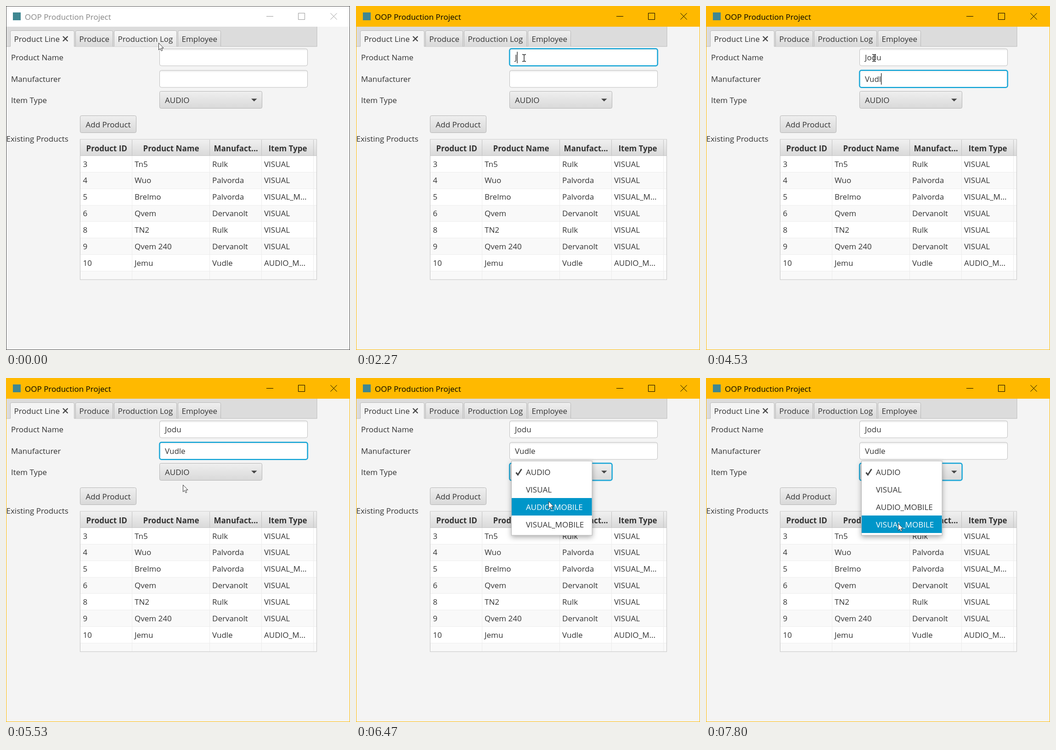
Animation, 749 px wide and 748 px high, one loop 8000 ms. Source, as an HTML page:

```html
<!DOCTYPE html>
<html lang="en">
<head>
<meta charset="utf-8">
<title>OOP Production Project</title>
<style>
html, body { margin: 0; width: 100%; height: 100%; overflow: hidden; background: #f4f4f4; }
svg { display: block; }
text { font: 17px "Open Sans", "Noto Sans", sans-serif; fill: #333; white-space: pre; }
.bold { font-weight: 700; }
.mid { text-anchor: middle; }
#popup { filter: drop-shadow(0 4px 6px rgba(0, 0, 0, .32)); }
</style>
</head>
<body>
<svg id="stage" width="749" height="748" viewBox="0 0 749 748"></svg>
<script>
const LOOP = 8000;
const stage = document.getElementById('stage');
const $ = id => document.getElementById(id);

// Markup helpers
const rect = (x, y, w, h, fill, more = '') =>
  `<rect x="${x}" y="${y}" width="${w}" height="${h}" fill="${fill}" ${more}/>`;
const text = (x, y, s, more = '') => `<text x="${x}" y="${y}" ${more}>${s}</text>`;
const line = (d, color, more = '') => `<path d="${d}" fill="none" stroke="${color}" ${more}/>`;
const gradient = (id, stops) =>
  `<linearGradient id="${id}" x2="0" y2="1">` +
  stops.map(([o, c]) => `<stop offset="${o}" stop-color="${c}"/>`).join('') + '</linearGradient>';

const defs = '<defs>' +
  gradient('btn', [[0, '#efefef'], [1, '#d9d9d9']]) +
  gradient('lit', [[0, '#f8f8f8'], [1, '#e6e6e6']]) +
  gradient('head', [[0, '#f0f0f0'], [1, '#d9d9d9']]) +
  gradient('input', [[0, '#ececec'], [.14, '#fff'], [1, '#fff']]) +
  '</defs>';

function titleBar() {
  return rect(0, 0, 749, 45, '#fff', 'id="bar"') +
    rect(15, 14, 17, 17, '#3f8791') +
    text(41, 29.5, 'OOP Production Project', 'id="title"') +
    line('M567 22.5H582M636.5 15.5H650.5V29.5H636.5ZM706.5 15.5L720.5 29.5M720.5 15.5L706.5 29.5',
      '#999', 'id="buttons"') +
    rect(.5, .5, 748, 747, 'none', 'id="frame"');
}

function tab(x, right, label, id = '') {
  const on = id === 'selected';
  const edge = `M${x + .5} 88V56.5Q${x + .5} 53.5 ${x + 3.5} 53.5H${right - 3.5}` +
    `Q${right - .5} 53.5 ${right - .5} 56.5V88`;
  return `<path id="${id}" d="${edge}${on ? 'v1H' + (x + .5) : ''}" ` +
    `fill="${on ? '#f4f4f4' : 'url(#btn)'}"/>` +
    line(edge, '#b8b8b8') + text(x + 8.5, 77.5, label);
}

function tabs() {
  return rect(1, 45, 676, 43, '#dcdcdc') +
    line('M1 88H677.5M677 45V88', '#bababa') +
    tab(9, 149, 'Product Line', 'selected') +
    line('M124 66L134.5 76.5M134.5 66L124 76.5', '#444', 'stroke-width="2.3"') +
    tab(151, 233, 'Produce') +
    tab(235, 372, 'Production Log', 'log') +
    tab(374, 468, 'Employee');
}

const ring = (id, x, y, w, h) => `<g id="${id}">` +
  rect(x - .5, y - .5, w + 1, h + 1, 'none', 'rx="4.5" stroke="#b5deed" stroke-width="3"') +
  rect(x, y, w, h, 'none', 'rx="4" stroke="#039ed3" stroke-width="2"') + '</g>';

const field = (i, y) =>
  rect(334.5, y + .5, 322, 37, 'url(#input)', 'rx="4" stroke="#bfbfbf"') +
  ring('ring' + i, 334.5, y + .5, 322, 37) +
  text(346, y + 25.5, '', `id="value${i}"`);

function form() {
  return text(11, 118, 'Product Name') + text(11, 165, 'Manufacturer') +
    text(11, 211, 'Item Type') + text(.5, 295, 'Existing Products') +
    field(0, 92.5) + field(1, 139.5) +
    rect(0, 0, 1.6, 25, '#444', 'id="caret"') +
    rect(334.5, 185.5, 223, 37, 'url(#btn)', 'id="combo" rx="3" stroke="#b4b4b4"') +
    ring('ring2', 334.5, 185.5, 223, 37) +
    text(346, 211, 'AUDIO') +
    '<path d="M534 201.5H546.5L540.2 207.5Z" fill="#444"/>' +
    rect(161.5, 238.5, 122, 37, 'url(#btn)', 'rx="3" stroke="#b4b4b4"') +
    text(222.5, 263.5, 'Add Product', 'class="mid"');
}

function table() {
  const cols = [161, 274.5, 443.5, 556.5, 669.5];
  const heads = ['Product ID', 'Product Name', 'Manufact...', 'Item Type'];
  const rows = [
    ['3', 'Tn5', 'Rulk', 'VISUAL'],
    ['4', 'Wuo', 'Palvorda', 'VISUAL'],
    ['5', 'Brelmo', 'Palvorda', 'VISUAL_M...'],
    ['6', 'Qvem', 'Dervanolt', 'VISUAL'],
    ['8', 'TN2', 'Rulk', 'VISUAL'],
    ['9', 'Qvem 240', 'Dervanolt', 'VISUAL'],
    ['10', 'Jemu', 'Vudle', 'AUDIO_M...'],
    []
  ];
  const step = 35.86;
  let out = rect(161, 290, 516, 305, '#fff');
  rows.forEach((row, i) => {
    const y = Math.round(325 + i * step), h = Math.min(36, 595 - y);
    if (i % 2) out += rect(162, y, 514, h, '#f9f9f9');
    if (i) out += line(`M162 ${y + .5}H676`, '#ededed');
    row.forEach((s, c) => out += text(cols[c] + (c ? 5.5 : 6.5), 349.5 + i * step, s));
  });
  out += rect(162, 291, 514, 34.5, 'url(#head)');
  cols.slice(1).forEach(x => out += line(`M${x} 326V595`, '#ececec') + line(`M${x} 291V325`, '#c3c3c3'));
  heads.forEach((s, c) => out += text((cols[c] + cols[c + 1]) / 2 + (c ? .5 : 1.5), 316, s, 'class="bold mid"'));
  return out + line('M162 325.5H676', '#c8c8c8') + rect(161.5, 290, 515, 305, 'none', 'stroke="#c4c4c4"');
}

const options = ['AUDIO', 'VISUAL', 'AUDIO_MOBILE', 'VISUAL_MOBILE'];
const popup = () => '<g id="popup">' +
  rect(338.5, 180.5, 175.5, 161.5, '#fff', 'stroke="#b7b7b7"') +
  rect(339, 185, 174.5, 38, '#0096c9', 'id="pick"') +
  line('M348.5 205.5L352.5 210.5L360.5 198', '#444', 'id="check" stroke-width="3"') +
  options.map((s, i) => text(370, 211 + i * 38, s, `id="opt${i}"`)).join('') + '</g>';

const pointers =
  '<path id="arrow" d="M.5 .5V15.5L3.9 12.3L6.3 17.7L8.7 16.7L6.4 11.4H11Z" fill="#fff" stroke="#333" stroke-width="1"/>' +
  line('M-4 -7.5H-1.5L0 -6.5L1.5 -7.5H4M0 -6.5V6.5M-4 7.5H-1.5L0 6.5L1.5 7.5H4', '#222', 'id="beam" stroke-width="1.4"');

stage.innerHTML = defs + rect(0, 0, 749, 748, '#f4f4f4') + tabs() + form() + table() +
  titleBar() + popup() + pointers;

// Timeline
const path = [
  [0, 332, 80], [334, 365, 112], [400, 365, 112], [467, 366, 113], [5000, 366, 113],
  [5267, 374, 165], [5534, 385, 232], [5600, 386, 214], [5667, 386, 208],
  [6267, 386, 208], [6467, 419, 268], [6534, 421, 271], [6600, 421, 271], [6667, 421, 272],
  [7200, 421, 272], [7600, 418, 318], [7734, 418, 318], [7800, 418, 316], [LOOP, 418, 316]
];
const typing = [
  { word: 'Jodu', at: [2270, 2530, 2670, 2800] },
  { word: 'Vudle', at: [3800, 4000, 4200, 4530, 4600] }
];
const caretFlips = [930, 1470, 1930, 5130, 5600, 5870];
const passed = (times, t) => times.filter(k => t >= k).length;

function pointerAt(t) {
  const q = Math.floor((t + 4) * .015) / .015;
  const i = Math.max(1, path.findIndex(p => p[0] >= q - .5));
  const [t0, x0, y0] = path[i - 1], [t1, x1, y1] = path[i];
  const k = Math.min(1, (q - t0) / (t1 - t0));
  return [Math.round(x0 + (x1 - x0) * k), Math.round(y0 + (y1 - y0) * k)];
}

const set = (id, name, value) => $(id).setAttribute(name, value);
const show = (id, on) => set(id, 'visibility', on ? 'visible' : 'hidden');

function draw(t) {
  const active = t >= 870, open = t >= 5930;
  const focus = !active ? -1 : t < 3200 ? 0 : t < 5870 ? 1 : 2;
  const [x, y] = pointerAt(t);

  set('bar', 'fill', active ? '#ffb900' : '#fff');
  set('frame', 'stroke', active ? '#ffb900' : '#4a4a4a');
  set('buttons', 'stroke', active ? '#000' : '#999');
  $('title').style.fill = active ? '#000' : '#858585';
  set('log', 'fill', t < 70 ? 'url(#lit)' : 'url(#btn)');

  for (let i = 0; i < 3; i++) show('ring' + i, focus === i);
  typing.forEach((f, i) => $('value' + i).textContent = f.word.slice(0, passed(f.at, t)));

  show('caret', passed(caretFlips, t) % 2);
  if (focus === 0 || focus === 1) {
    set('caret', 'x', 345.8 + $('value' + focus).getComputedTextLength());
    set('caret', 'y', focus ? 146 : 99.5);
  }

  const overCombo = x >= 334 && x < 558 && y >= 185 && y < 223;
  set('combo', 'fill', overCombo && !open ? 'url(#lit)' : 'url(#btn)');

  show('popup', open);
  const pick = Math.max(0, Math.min(3, Math.floor((y - 185) / 38)));
  set('pick', 'y', 185 + pick * 38);
  set('check', 'stroke', pick ? '#444' : '#fff');
  options.forEach((s, i) => $('opt' + i).style.fill = i === pick ? '#fff' : '#333');

  const inField = x >= 334 && x < 657 && (y >= 93 && y < 131 || y >= 140 && y < 178);
  show('arrow', !inField);
  show('beam', inField);
  set('arrow', 'transform', `translate(${x} ${y})`);
  set('beam', 'transform', `translate(${x} ${y})`);
}

const start = performance.now();
function tick() {
  draw((performance.now() - start) % LOOP);
  requestAnimationFrame(tick);
}
tick();
</script>
</body>
</html>
```
